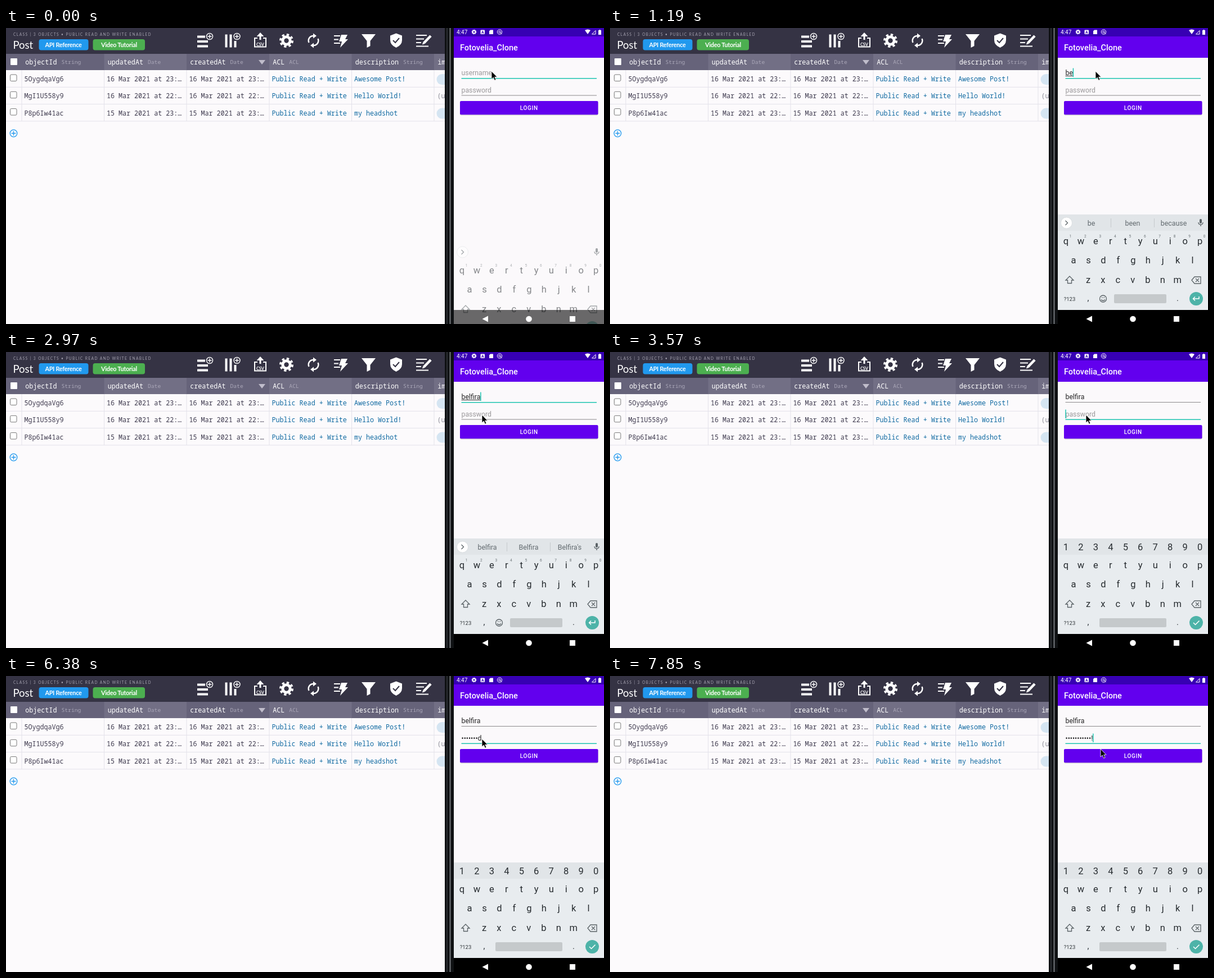
Write an HTML page that moves like this. It is 1063 px wide and 527 px high and loops after 8000 ms.

```html
<!DOCTYPE html>
<html lang="en">
<head>
<meta charset="utf-8">
<title>Login demo</title>
<style>
  html, body { margin: 0; width: 100%; height: 100%; overflow: hidden; background: #fcfafc; }
  svg { display: block; }
  text { white-space: pre; }
  .ui { font-family: Lato, sans-serif; fill: #fff; }
  .mono { font: 11.7px "Noto Sans Mono", monospace; }
  .roboto { font-family: Roboto, sans-serif; }
  .mid { text-anchor: middle; }
  .line { fill: none; stroke: #fff; stroke-width: 2; }
  .field { font-size: 12.3px; }
  .icon { fill: none; stroke: #5a6266; stroke-width: 1.3; }
</style>
</head>
<body>
<svg width="1063" height="527" viewBox="0 0 1063 527">
  <rect width="1063" height="527" fill="#fcfafc"/>

  <!-- dashboard -->
  <rect width="780" height="46" fill="#353344"/>
  <rect y="46" width="780" height="29" fill="#66637a"/>
  <text class="ui" x="13" y="13.500" font-size="6.600" letter-spacing="1.420" style="fill:#a5a2b0">CLASS | 3 OBJECTS • PUBLIC READ AND WRITE ENABLED</text>
  <text class="ui" x="12.500" y="36.500" font-size="18.500">Post</text>
  <rect x="58.500" y="20" width="88" height="19.500" rx="4" fill="#2199ee"/>
  <rect x="154.500" y="20" width="92.500" height="19.500" rx="4" fill="#4caf50"/>
  <g class="ui mid" font-size="10.800" font-weight="700" letter-spacing="-.25">
    <text x="102" y="34">API Reference</text>
    <text x="201" y="34">Video Tutorial</text>
  </g>

  <!-- toolbar -->
  <g class="line">
    <path d="M340 15.500h14M340 24h19M340 32.500h19" stroke-width="4"/>
    <path d="M391.500 11.500v23M399.500 11.500v23M407.500 23v11.500" stroke-width="4"/>
    <g stroke-width="1.400">
      <circle cx="362" cy="15" r="5.500"/><path d="M358.500 15h7M362 11.500v7"/>
      <circle cx="410.500" cy="15" r="5.500"/><path d="M407 15h7M410.500 11.500v7"/>
    </g>
    <path d="M447 18h-5v15.500h20V18h-5"/>
    <path d="M452 21v-8" stroke-width="3"/>
    <circle cx="498.500" cy="22.500" r="6.700" stroke-width="5"/>
    <circle cx="498.500" cy="22.500" r="10.500" stroke-width="4" stroke-dasharray="4.200 4.047"/>
    <path d="M538.500 26a8.500 8.500 0 0 1 8.500-12M554.500 19a8.500 8.500 0 0 1-8.500 12" stroke-width="2.500"/>
    <path d="M583 14h11M583 20.500h8M583 27h11" stroke-width="2.200"/>
    <path d="M729 13h19M729 19.500h14M729 26h9M729 32.500h22" stroke-width="2.200"/>
    <path d="M741 29L756 13" stroke="#353344" stroke-width="8"/>
    <path d="M743 26.500L755 14" stroke-width="4.500"/>
  </g>
  <g fill="#fff">
    <path d="M445.500 15l6.500-7 6.500 7zM546 9.500v9l6-4.500zM547 26.500v9l-6-4.500z"/>
    <path d="M596 12h11l-4 8h5L594 35l3-11h-5z"/>
    <path d="M632 11h25l-9.500 12v9l-6 3V23z"/>
    <path d="M693.500 9.500l10.500 4v8q0 9-10.500 13.500q-10.500-4.500-10.500-13.500v-8z"/>
    <path d="M740 29.500l1.300-4.600 3.300 3.200z"/>
  </g>
  <path d="M688 22l4 4 7-8" class="line" style="stroke:#353344"/>
  <text class="ui mid" x="452" y="31.500" font-size="7.500" font-weight="700">CSV</text>

  <!-- table -->
  <g id="table"></g>
  <path d="M449 57h12l-6 8z" fill="#c0bdcb"/>
  <g class="icon" style="stroke:#2199ee"><circle cx="13.500" cy="187.500" r="6.300"/><path d="M9.500 187.500h8M13.500 183.500v8"/></g>

  <!-- phone -->
  <rect x="780" width="283" height="527" fill="#0f1113"/>
  <path d="M784 0v527" stroke="#2c2f33" stroke-width="2"/>
  <path d="M789.500 0v527" stroke="#75787c" stroke-width="2"/>
  <rect x="796" width="267" height="527" fill="#fbf9fb"/>
  <rect x="796" width="267" height="15" fill="#3700b3"/>
  <rect x="796" y="15" width="267" height="38" fill="#6200ee"/>
  <g class="roboto" fill="#fff">
    <text x="801" y="11" font-size="10">4:47</text>
    <text x="807" y="40" font-size="14.500" font-weight="500">Fotovelia_Clone</text>
    <rect x="843.500" y="3.500" width="7.500" height="7.500" rx="1"/>
    <path d="M859 5.500l2-2h5V11h-7zM1029 4q5-3 10 0l-5 7zM1053 4h1.500V3h2v1h1.500v8h-5z"/>
    <text class="mid" x="847.250" y="9.800" font-size="7" font-weight="700" style="fill:#3700b3">A</text>
    <g fill="none" stroke="#fff">
      <path d="M1041.500 11h6.500V4.500z"/>
      <circle cx="832" cy="7" r="2.600" stroke-width="2"/>
      <circle cx="832" cy="7" r="4" stroke-dasharray="1.600 1.540"/>
      <circle cx="877.500" cy="7" r="4.200"/><circle cx="877.500" cy="7" r="1.700"/><path d="M879 8l2.500 3"/>
    </g>
  </g>

  <g class="roboto field">
    <text id="user" x="809.500" y="84"/>
    <text id="pass" x="809.500" y="115"/>
  </g>
  <rect id="userLine" x="809.500" width="240.500"/>
  <rect id="passLine" x="809.500" width="240.500"/>
  <rect id="composing" x="809.500" y="85" height="1" fill="#333"/>
  <rect id="caret" width="1.400" height="15.500" fill="#10c0ac"/>
  <rect x="807" y="131" width="245.500" height="24.500" rx="2" opacity=".18"/>
  <rect x="807" y="130" width="245.500" height="24.300" rx="2" fill="#6200ee"/>
  <text class="roboto mid" x="929.800" y="146" font-size="10" font-weight="500" letter-spacing=".7" fill="#fff">LOGIN</text>

  <g id="keyboard" class="roboto mid">
    <g id="keyBack">
      <rect x="796" y="332" width="267" height="170" fill="#e8ecef"/>
      <rect x="796" y="332" width="267" height="29" fill="#e1e5e8"/>
    </g>
    <g id="keys" font-size="16.500" fill="#262b2f"></g>
    <g id="numbers" font-size="16.500" fill="#262b2f"></g>
    <g id="textExtras">
      <g id="hints" font-size="6.500" fill="#6a7276"></g>
      <circle cx="811.500" cy="347" r="10" fill="#fff" stroke="#d3d7da" stroke-width=".7"/>
      <path class="icon" d="M809.500 343l4 4-4 4"/>
      <rect x="1048" y="340" width="4" height="8" rx="2" fill="#5a6266"/>
      <path class="icon" d="M1046 346q0 4 4 4t4-4M1050 350v3"/>
      <g class="icon"><circle cx="876.500" cy="482" r="6"/><path d="M873 483.500q3.500 4 7 0M874 480h1.500M877.500 480h1.500"/></g>
      <path id="dividers" d="M890.500 339v16M967.500 339v16" stroke="#c6cacd"/>
      <g id="words" font-size="12.400"></g>
    </g>
    <path class="icon" d="M817 442l7 7h-3.500v5.500h-7V449H810z"/>
    <path class="icon" d="M1034 449l5-6h11v12h-11zM1041 446l6 6M1047 446l-6 6"/>
    <g fill="#30363a"><text x="817" y="486" font-size="9.500">?123</text><text x="850" y="486" font-size="15">,</text><text x="1009" y="486" font-size="15">.</text></g>
    <rect id="space" y="474" height="16" rx="2" fill="#c5c9cb"/>
    <circle cx="1042" cy="482" r="12" fill="#4db3a8"/>
    <path id="enter" class="line" style="stroke-width:1.500"/>
  </g>

  <rect id="nav" x="796" y="502" width="267" height="25"/>
  <path d="M857 512.500v11l-10.500-5.500zM1002 513h10v10h-10z" fill="#fff"/>
  <circle cx="929.500" cy="518" r="5.300" fill="#fff"/>
  <path id="pointer" d="M0 0v14l3.300-3 2.300 5.300 2.400-1-2.300-5.100H10z" fill="#000" stroke="#fff" stroke-width=".8"/>
</svg>

<script>
const $ = id => document.getElementById(id);
const set = (id, attrs) => { for (const k in attrs) $(id).setAttribute(k, attrs[k]); };
const show = (id, on) => set(id, { visibility: on ? 'visible' : 'hidden' });
const label = (x, y, s, extra = '') => `<text x="${x}" y="${y}" ${extra}>${s}</text>`;

function buildTable() {
  const edges = [28, 174.5, 321, 468, 614.5, 761];
  const heads = ['objectId String', 'updatedAt Date', 'createdAt Date', 'ACL ACL', 'description String', 'im '];
  const rows = [
    ['5OygdqaVg6', '16 Mar 2021 at 23:…', 'Awesome Post!'],
    ['MgI1U558y9', '16 Mar 2021 at 22:…', 'Hello World!'],
    ['P8p6Iw41ac', '15 Mar 2021 at 23:…', 'my headshot']
  ];
  let out = '<rect x="8" y="54" width="12" height="12" rx="1" fill="#fff"/>';
  heads.forEach((head, i) => {
    const [name, type] = head.split(' '), x = edges[i] + 6.3;
    if (i % 2) out += `<rect x="${edges[i]}" y="46" width="146.500" height="29" fill="#726f85"/>`;
    out += `<path d="M${edges[i]} 75v91" stroke="#e3e2ea"/>`;
    out += label(x, 64.5, name, 'class="mono" fill="#fff"');
    out += label(x + name.length * 7.02 + 8, 64, type, 'class="mono" style="font-size:9.7px" fill="#aaa7b8"');
  });
  rows.forEach(([id, date, note], r) => {
    const y = 95 + r * 30.3;
    out += `<path d="M0 ${y + 10.3}h780" stroke="#e3e2ea"/>`;
    out += `<rect x="7.5" y="${y - 12}" width="11.500" height="11.500" rx="2" fill="#fff" stroke="#777"/>`;
    [id, date, date, 'Public Read + Write', note].forEach((s, i) =>
      out += label(edges[i] + 4.5, y, s, `class="mono" fill="${i > 2 ? '#0e69a1' : '#3e3a4e'}"`));
    out += r === 1 ? label(766.5, y, '(u', 'class="mono" fill="#8d8d98"')
      : `<rect x="765.5" y="${y - 13}" width="40" height="19" rx="9.500" fill="#d5e5f2"/>`;
  });
  $('table').innerHTML = out;
}

const STEP = 26.45;
const keyRow = (chars, x, y) => [...chars].map((c, i) => label(x + i * STEP, y, c)).join('');

function buildKeys() {
  $('keys').innerHTML = keyRow('qwertyuiop', 810.5, 385) + keyRow('asdfghjkl', 824, 419) + keyRow('zxcvbnm', 850, 454);
  $('numbers').innerHTML = keyRow('1234567890', 810.5, 353);
  $('hints').innerHTML = keyRow('1234567890', 818.5, 373);
  $('words').innerHTML = [855.5, 929, 1002].map(x => label(x, 352, '')).join('');
}

// Each entry changes part of the state from its time on.
const timeline = [
  [0, { user: '', pass: '', words: '', focus: 'user', caret: false, secure: false, caps: false, best: false, rising: true, x: 863, y: 77 }],
  [150, { rising: false }],
  [450, { user: 'b', caret: true }],
  [600, { words: 'b but been' }],
  [1040, { user: 'be' }],
  [1190, { words: 'be been because' }],
  [1490, { user: 'bel' }],
  [1640, { words: 'bel below believe' }],
  [1790, { user: 'belf', words: 'belf belfry belfries' }],
  [2090, { user: 'belfir', words: 'belfir belfira Belfira', best: true }],
  [2240, { user: 'belfira' }],
  [2380, { words: "belfira Belfira Belfira's", best: false }],
  [2530, { x: 861, y: 83 }],
  [2680, { x: 854, y: 98 }],
  [2820, { x: 848, y: 109 }],
  [2970, { x: 846, y: 112 }],
  [3270, { focus: 'pass' }],
  [3410, { words: '' }],
  [3560, { secure: true }],
  [4010, { caret: false }],
  [4460, { pass: 'p', caret: true }],
  [4600, { pass: 'pa' }],
  [4900, { pass: 'pas' }],
  [5040, { pass: 'pass' }],
  [5190, { pass: 'passw' }],
  [5340, { pass: 'passwo' }],
  [5480, { pass: 'passwor' }],
  [5780, { pass: 'password' }],
  [6380, { caret: false }],
  [6520, { pass: 'password1', caret: true }],
  [6820, { pass: 'password12' }],
  [6960, { pass: 'password123' }],
  [7410, { caps: true }],
  [7560, { pass: 'password123!' }],
  [7700, { caps: false, x: 860, y: 120 }],
  [7850, { x: 872, y: 130 }]
];

function drawField(id, value, hint, y, focused) {
  $(id).textContent = value || hint;
  set(id, { fill: value ? '#252525' : '#9b999b' });
  set(id + 'Line', { y, height: focused ? 1.5 : 1, fill: focused ? '#1cc4b0' : '#8b898b' });
}

function draw(t) {
  const s = Object.assign({}, ...timeline.filter(([at]) => at <= t).map(([, change]) => change));
  const inUser = s.focus === 'user';
  const masked = '•'.repeat(Math.max(0, s.pass.length - 1)) + s.pass.slice(-1);
  drawField('user', s.user, 'username', 89, inUser);
  drawField('pass', masked, 'password', 119.5, !inUser);

  const width = s[s.focus] ? $(s.focus).getComputedTextLength() : 0;
  set('composing', { width: inUser && s.user ? width : 0 });
  set('caret', { x: 809.3 + width, y: inUser ? 71.5 : 102.5 });
  show('caret', s.caret);

  const words = s.words.split(' ');
  [...$('words').children].forEach((el, i) => {
    const bold = s.best && i === 1;
    el.textContent = words[i] || '';
    el.setAttribute('fill', bold ? '#000' : '#626a6f');
    el.setAttribute('font-weight', bold ? 700 : 400);
  });
  set('dividers', { opacity: s.words ? 1 : 0 });

  for (const el of $('keys').children)
    el.textContent = s.caps ? el.textContent.toUpperCase() : el.textContent.toLowerCase();
  show('numbers', s.secure);
  show('textExtras', !s.secure);
  const left = s.secure ? 870 : 896;
  set('space', { x: left, width: 989 - left });
  set('enter', { d: s.secure ? 'M1037 482l3.500 3.500 7-7' : 'M1047 478v4h-10M1040 478.500l-3.500 3.500 3.500 3.500' });

  set('keyboard', { transform: `translate(0 ${s.rising ? 52 : 0})`, opacity: s.rising ? 0.55 : 1 });
  show('keyBack', !s.rising);
  set('nav', { 'fill-opacity': s.rising ? 0.58 : 1 });
  set('pointer', { transform: `translate(${s.x} ${s.y})` });
}

buildTable();
buildKeys();
const start = performance.now();
(function tick() {
  draw((performance.now() - start) % 8000);
  requestAnimationFrame(tick);
})();
</script>
</body>
</html>
```
